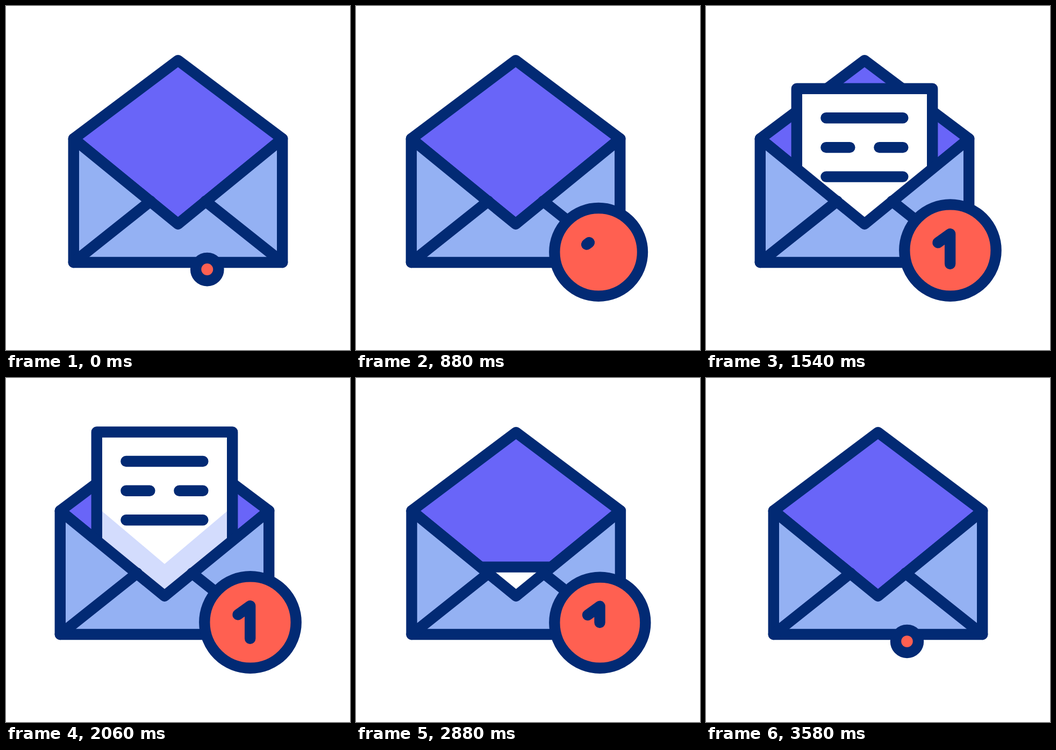
Animation of 640x640 px, one loop 3600 ms. Source, as an HTML page:

```html
<!DOCTYPE html>
<html lang="en">
<head>
<meta charset="utf-8">
<title>New mail</title>
<style>
  html, body { margin: 0; width: 100%; height: 100%; overflow: hidden; background: #fff; }
  svg { display: block; width: 100%; height: 100%; }
  .line { fill: none; stroke: #022a74; stroke-width: 20.4; stroke-linecap: round; stroke-linejoin: round; }
</style>
</head>
<body>
<svg viewBox="0 0 640 640">
  <defs>
    <clipPath id="slot"><path d="M100 0H490V247L295 406L100 247Z"/></clipPath>
  </defs>
  <g id="mail">
    <path class="line" style="fill:#6965f8" d="M100.8 247L295 101.2L489.2 247L295 405.7Z"/>
    <g clip-path="url(#slot)">
      <g id="paper">
        <path fill="#fff" d="M168.8 100.5H421.2V440H168.8Z"/>
        <path fill="#d3dcfd" d="M168.8 239.4L295 346L421.2 239.4V440H168.8Z"/>
        <path class="line" d="M168.8 440V100.5H421.2V440"/>
        <path class="line" d="M223.4 155H366.4M223.4 209.8H267.4M322.4 209.8H366.4M223.4 264.3H366.4"/>
      </g>
    </g>
    <path class="line" style="fill:#94b1f3" d="M100.8 247L295 405.7L489.2 247V477H100.8Z"/>
    <path class="line" d="M100.8 477L244 363M489.2 477L346 363"/>
  </g>
  <circle id="badge" class="line" style="fill:#ff6051"/>
  <path id="one" class="line" pathLength="100"/>
</svg>
<script>
const LOOP = 3600;
const FULL = { x: 454.5, y: 454.5, r: 85.2 };
const MIN_R = 21;
const ONE = [[-23, -14.2], [-0.3, -30.5], [-0.3, 30.3]];

const [mail, paper, badge, one] = ['mail', 'paper', 'badge', 'one'].map(id => document.getElementById(id));

const span = (t, a, b) => Math.min(1, Math.max(0, (t - a) / (b - a)));
const smooth = u => u * u * (3 - 2 * u);
const inOut = (u, p) => u < 0.5 ? 2 ** (p - 1) * u ** p : 1 - 2 ** (p - 1) * (1 - u) ** p;

// Rises over the first span, falls back over the second
const there = (t, a, b, c, d, ease) => ease(span(t, a, b)) - ease(span(t, c, d));

function draw(t) {
  const shift = there(t, 240, 1020, 2720, 3500, smooth);
  mail.setAttribute('transform', `translate(${25 * (1 - shift)} 0)`);

  const lift = there(t, 537, 2060, 2200, 3366, u => inOut(u, 3.1));
  paper.setAttribute('transform', `translate(0 ${350 * (1 - lift)})`);

  // The badge grows from its lower left corner
  const left = (1 - span(t, 0, 2060)) ** 5.3 + span(t, 2200, 3580) ** 6.5;
  const r = FULL.r + (MIN_R - FULL.r) * left;
  const x = FULL.x - FULL.r + r - 16.3 * left ** 3;
  const y = FULL.y + FULL.r - r - 28.7 * left ** 3;
  badge.setAttribute('cx', x);
  badge.setAttribute('cy', y);
  badge.setAttribute('r', r);

  const k = r / FULL.r;
  const drawn = 100 * there(t, 540, 1860, 2440, 3440, u => inOut(u, 3));
  one.setAttribute('d', 'M' + ONE.map(([px, py]) => `${x + px * k} ${y + py}`).join('L'));
  one.setAttribute('stroke-dasharray', `${Math.max(drawn, 0.01)} 300`);
  one.setAttribute('visibility', drawn > 0 ? 'visible' : 'hidden');
}

const start = performance.now();
function tick(now) {
  draw(Math.max(0, now - start) % LOOP);
  requestAnimationFrame(tick);
}
draw(0);
requestAnimationFrame(tick);
</script>
</body>
</html>
```
